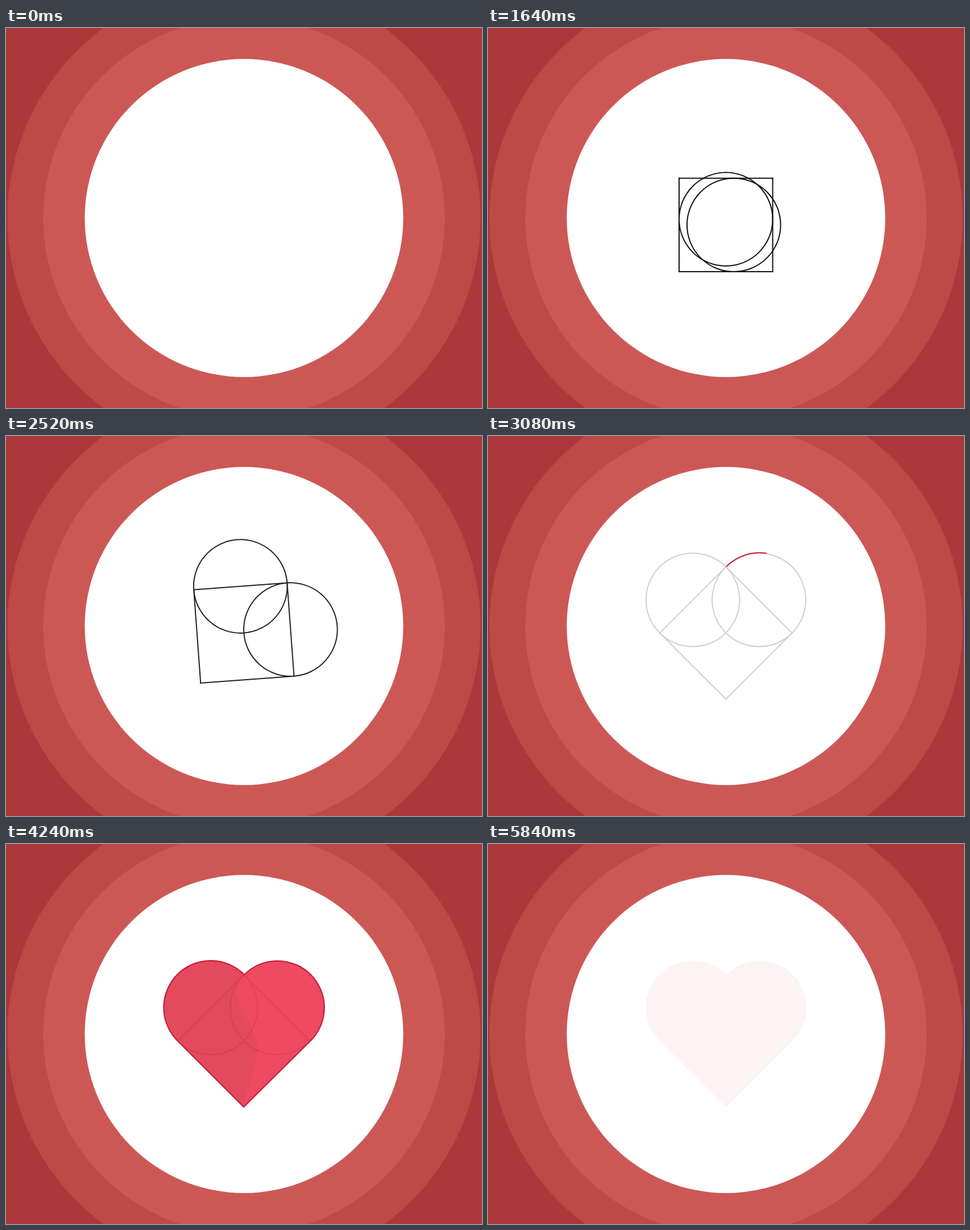
An HTML page that plays this animation: 837 px wide and 669 px high, repeating every 5960 ms.

```html
<!DOCTYPE html>
<html>
<head>
<meta charset="utf-8">
<style>
  html, body { margin: 0; width: 100%; height: 100%; overflow: hidden; background: #ab393c; }
  svg { display: block; width: 837px; height: 669px; }
</style>
</head>
<body>
<svg viewBox="0 0 837 669">
  <g transform="translate(418.5 334.5)">
    <circle r="416" fill="#bd4a46"/>
    <circle r="353" fill="#cc5856"/>
    <circle r="280" fill="#fff"/>
  </g>
  <g id="sketch" fill="none" stroke-width="2">
    <path id="right" pathLength="1" d="M82.3 -83.3V83.3"/>
    <path id="bottom" d="M83.3 82.3H-83.3"/>
    <path id="left" d="M-82.3 83.3V-83.3"/>
    <path id="top" d="M-83.3 -82.3H83.3"/>
    <circle id="ringA" r="82.3" pathLength="1"/>
    <circle id="ringB" r="82.3" pathLength="1"/>
  </g>
  <g id="fill">
    <path fill="#dd1d36" d="M419 230A82 82 0 0 1 536 346L418 463L301 346A82 82 0 0 1 419 230"/>
    <path fill="#ea1d3b" d="M419 230A82 82 0 0 1 536 346L418 463C422 430 440 392 442 365C442 322 411 302 407 270C405 254 409 241 419 230"/>
  </g>
  <path id="outline" pathLength="1" fill="none" stroke="#c81e36" stroke-width="2"
    d="M419 230A82 82 0 0 1 536 346L418 463L301 346A82 82 0 0 1 419 230"/>
</svg>
<script>
const LOOP = 5960, LAST = 5840;
const el = id => document.getElementById(id);
const set = (id, name, value) => el(id).setAttribute(name, value);
const move = (id, x, y) => set(id, 'transform', `translate(${x} ${y})`);

const span = (t, from, to) => Math.min(1, Math.max(0, (t - from) / (to - from)));
const sine = (t, from, to) => (1 - Math.cos(Math.PI * span(t, from, to))) / 2;

function trace(id, p) {
  set(id, 'stroke-dasharray', p < 1 ? `${p} 2` : 'none');
  set(id, 'visibility', p > 0 ? 'visible' : 'hidden');
}

// A side of the square glides in from an offset while it appears.
function slide(id, t, from, to, dx, dy) {
  const rest = (1 - span(t, from, to)) ** 2;
  move(id, dx * rest, dy * rest);
  set(id, 'opacity', span(t, from, from + 80));
}

function draw(t) {
  trace('right', sine(t, 10, 220));
  slide('bottom', t, 130, 350, 0, 55);
  slide('left', t, 290, 520, -155, 0);
  slide('top', t, 540, 740, 0, -205);

  const ring = sine(t, 600, 1285);
  trace('ringA', ring);
  trace('ringB', ring);
  move('ringA', 82.3 * sine(t, 1409, 2268), 0);
  move('ringB', 0, -82.3 * sine(t, 1446, 2305));

  const turn = sine(t, 2420, 2930);
  const gray = 17 + 191 * turn;
  set('sketch', 'transform', `translate(418.3 346.7) rotate(${-45 * turn})`);
  set('sketch', 'stroke', `rgb(${gray},${gray},${gray})`);

  const settle = 1 - sine(t, 4240, 4640);
  set('sketch', 'opacity', settle);
  trace('outline', sine(t, 2950, 3620));
  set('outline', 'opacity', settle);

  const fade = span(t, 5020, 5860) ** 2;
  set('fill', 'opacity', sine(t, 3660, 4483) * (1 - fade));
}

const start = performance.now();
function tick() {
  draw(Math.min((performance.now() - start) % LOOP, LAST));
  requestAnimationFrame(tick);
}
tick();
</script>
</body>
</html>
```
